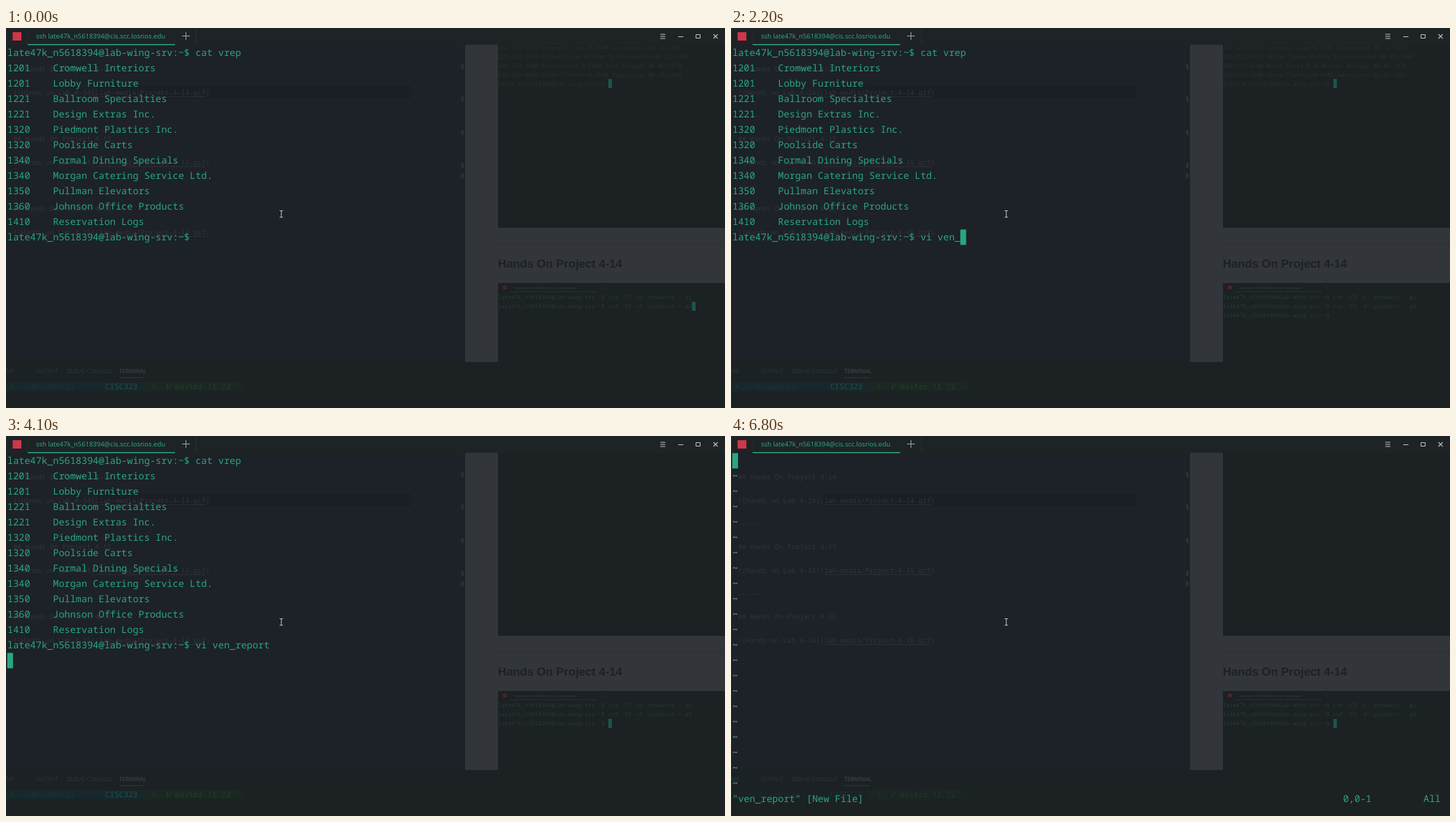
Animation of 1029 by 544 pixels, one loop 8 s. Source, as an HTML page:

```html
<!DOCTYPE html>
<html lang="en">
<head>
<meta charset="utf-8">
<title>Terminal</title>
<style>
  html, body { margin: 0; width: 100%; height: 100%; overflow: hidden; background: #1d2128; }
  svg { display: block; width: 1029px; height: 544px; }
  text { white-space: pre; text-rendering: geometricPrecision; }
  .mono { font-family: "Noto Sans Mono", "DejaVu Sans Mono", monospace; }
  .sans { font-family: "Noto Sans", "Open Sans", sans-serif; }
  .bold { font-family: "Liberation Sans", Arial, sans-serif; font-weight: 700; }
</style>
</head>
<body>
<svg id="stage" viewBox="0 0 1029 544" xmlns="http://www.w3.org/2000/svg"></svg>
<script>
const LOOP = 8000;
const COL = 8.16, ROW = 22, LEFT = 2, TOP = 24;
const GREEN = '#29a77f', DARK = '#1c2123', PAGE = '#32363a';
const USER = 'late47k_n5618394';
const PROMPT = USER + '@lab-wing-srv:~$ ';
const COMMAND = 'vi ven_report';
const stage = document.getElementById('stage');

function add(parent, tag, attrs, content) {
  const el = document.createElementNS('http://www.w3.org/2000/svg', tag);
  for (const key in attrs) el.setAttribute(key, attrs[key]);
  if (content !== undefined) el.textContent = content;
  parent.appendChild(el);
  return el;
}
const group = (parent = stage) => add(parent, 'g', {});
const rect = (parent, x, y, width, height, fill) =>
  add(parent, 'rect', { x, y, width, height, fill });
const line = (parent, d, stroke, width = 1) =>
  add(parent, 'path', { d, stroke, 'stroke-width': width, fill: 'none' });
const label = (parent, x, y, size, fill, content, font = 'mono') =>
  add(parent, 'text', { x, y, 'font-size': size, fill, class: font }, content);
const cell = (parent, col, row, content, fill = GREEN) =>
  label(parent, LEFT + col * COL, TOP + row * ROW + 16, 13.6, fill, content);
const show = (el, on) => el.setAttribute('visibility', on ? 'visible' : 'hidden');

// Windows showing through the translucent terminal
const back = group();
rect(back, 0, 0, 1029, 544, DARK);
rect(back, 0, 24, 657, 454, '#1d2128');
rect(back, 657, 24, 372, 454, PAGE);
rect(back, 704, 24, 325, 262, DARK);
rect(back, 704, 365, 325, 113, DARK);
rect(back, 704, 308, 325, 1, '#2b2f33');
label(back, 704, 343, 16.68, '#1d2125', 'Hands On Project 4-14', 'bold');

// Editor
const DIM = '#30353b';
rect(back, 130, 82, 450, 19, '#1b1f25');
[14, 15, 16].forEach((n, i) => {
  const y = 62 + i * 100;
  label(back, 10, y, 9.79, DIM, `## Hands On Project 4-${n}`);
  label(back, 10, y + 33.5, 9.79, DIM, `![Hands on Lab 4-${n}](lab-media/Project-4-${n}.gif)`);
  rect(back, 133, y + 36, 153, 1, '#2b3035');
  label(back, 10, y + 67, 9.79, DIM, '------');
});
rect(back, 648, 24, 1, 192, '#20252b');
[52, 98, 146, 193, 208].forEach(y => rect(back, 651, y, 4, 7, '#2a2f34'));

// Panel tabs and shell prompt
label(back, 0, 494, 8, '#30363a', 'ME', 'sans');
label(back, 43, 494, 8, '#30363a', 'OUTPUT', 'sans');
label(back, 86, 494, 8, '#30363a', 'DEBUG CONSOLE', 'sans');
label(back, 162, 494, 8, '#454b4f', 'TERMINAL', 'sans');
rect(back, 162, 500, 37, 1, '#30363a');
const path = group(back);
add(path, 'path', { d: 'M0 507H192L198 513.5L192 520H0Z', fill: '#18272b' });
label(path, 5, 517, 11, '#1c4038', '>');
label(path, 20, 517, 11, '#1b363b', '~/documents/');
label(path, 142, 517, 11, '#1e5549', 'CISC323');
const branch = group(back);
add(branch, 'path', { d: 'M193 507H335L341 513.5L335 520H193L199 513.5Z', fill: '#1b2723' });
label(branch, 209, 517, 11, '#26402e', '>');
line(branch, 'M231 509V518M235 509V512L231 515', '#26402e');
label(branch, 242, 517, 11, '#26402e', 'master !1 ?2');

// Small terminals in the page preview
const SMALL = 7.98, STEP = 4.79, FAINT = '#253b36', BLOCK = '#1d5549';
const small = (parent, y, content, fill = FAINT) => label(parent, 704, y, SMALL, fill, content);
const block = (parent, col, y) => rect(parent, 704 + col * STEP, y, 5, 13, BLOCK);

const listing = group(back);
[
  '234:432:4567:Carverly:Joan:M:4540:Accountant:09-12-1985',
  '324:432:4567:Millet:Susan:M:4540:Sr Accountant:08-22-1986',
  '438:432:4500:Mason:Greta:M:4540:Dept Manager:06-03-1978',
  '238:432:4500:Olsen:Timothy:M:4540:Supervisor:06-28-1983',
  PROMPT
].forEach((content, i) => small(listing, 31 + i * 13, content, '#26332f'));
const listingBlock = block(back, 33, 73);

rect(back, 711, 369, 6, 5, '#4a2529');
label(back, 728, 374, 5, '#27433c', USER + '@cis.scc.losrios.edu', 'sans');
label(back, 852, 374, 6, '#3a4043', '+', 'sans');
rect(back, 722, 377, 122, 1, '#21352f');
small(back, 388, PROMPT + 'cut -f2 -d: products > p1');
small(back, 401, PROMPT + 'cut -f2 -d: products > p2');
const oldBlock = block(back, 58, 392);
const nextPrompt = small(back, 414, PROMPT);
const nextBlock = block(back, 33, 405);

// Title bar
const bar = group();
rect(bar, 0, 0, 1029, 24, '#1e2326');
rect(bar, 0, 0, 1, 544, '#24292c');
rect(bar, 30, 1, 1, 22, '#24292c');
rect(bar, 272, 1, 1, 22, '#282d30');
rect(bar, 9.5, 6, 12.5, 12, '#cf364b');
label(bar, 43, 15, 9.46, GREEN, `ssh ${USER}@cis.scc.losrios.edu`, 'sans');
rect(bar, 31, 23, 211, 1.5, GREEN);
line(bar, 'M252 11.5H263M257.5 6V17', '#a2a7a9');
line(bar, 'M936.5 9H943.5M936.5 12H943.5M936.5 15H943.5', '#c3c7c8');
line(bar, 'M962 12.5H969.5', '#c3c7c8');
line(bar, 'M987.5 9.5H993.5V14.5H987.5Z', '#c3c7c8');
line(bar, 'M1012.5 9L1018.5 15M1018.5 9L1012.5 15', '#c3c7c8', 1.2);

// Shell screen
const shell = group();
cell(shell, 0, 0, PROMPT + 'cat vrep');
[
  '1201    Cromwell Interiors',
  '1201    Lobby Furniture',
  '1221    Ballroom Specialties',
  '1221    Design Extras Inc.',
  '1320    Piedmont Plastics Inc.',
  '1320    Poolside Carts',
  '1340    Formal Dining Specials',
  '1340    Morgan Catering Service Ltd.',
  '1350    Pullman Elevators',
  '1360    Johnson Office Products',
  '1410    Reservation Logs'
].forEach((content, i) => cell(shell, 0, i + 1, content));
const entry = cell(shell, 0, 12, PROMPT);

// Editor screen
const vim = group();
for (let row = 1; row <= 21; row++) cell(vim, 0, row, '~', '#50b3d6');
cell(vim, 0, 22, '"ven_report" [New File]');
cell(vim, 107.1, 22, '0,0-1');
cell(vim, 121.2, 22, 'All');

const cursor = rect(stage, 0, 0, 8.3, 22, GREEN);
line(stage, 'M391.5 261.5H393L394 262.3L395 261.5H396.5M394 262V270.5M391.5 271H393L394 270.2L395 271H396.5',
  '#101214', 2.6);
line(stage, 'M391.5 261.5H393L394 262.3L395 261.5H396.5M394 262V270.5M391.5 271H393L394 270.2L395 271H396.5',
  '#c9cccd', 1.1);

const KEYS = [500, 700, 900, 1400, 1600, 1800, 2200, 2600, 2900, 3000, 3200, 3300, 3500];
const BLINKS = [100, 700, 1300, 1900];
const ENTER = 4100, OPEN = 4400, CLEAR = 3100;
const passed = (times, t) => times.filter(at => at <= t).length;

function draw(t) {
  const typed = passed(KEYS, t);
  const open = t >= OPEN;
  show(shell, !open);
  show(vim, open);
  entry.textContent = PROMPT + COMMAND.slice(0, typed);

  let col = 0, row = 0, lit = true;
  if (open) {
    lit = Math.floor((t - OPEN) / 600) % 2 === 0;
  } else if (t >= ENTER) {
    row = 13;
  } else {
    row = 12;
    col = PROMPT.length + typed;
    lit = t >= 100;
  }
  cursor.setAttribute('x', LEFT - 0.2 + col * COL);
  cursor.setAttribute('y', TOP + 0.5 + row * ROW);
  show(cursor, lit);

  show(listing, t < CLEAR);
  show(listingBlock, t < CLEAR && passed(BLINKS, t) % 2 === 0);
  show(oldBlock, t < 700);
  show(nextPrompt, t >= 700);
  show(nextBlock, t >= 3300);
  path.setAttribute('opacity', open ? 0.3 : 1);
  branch.setAttribute('opacity', open ? 0.75 : 1);
}

const start = performance.now();
function tick() {
  draw((performance.now() - start) % LOOP);
  requestAnimationFrame(tick);
}
draw(0);
requestAnimationFrame(tick);
</script>
</body>
</html>
```
